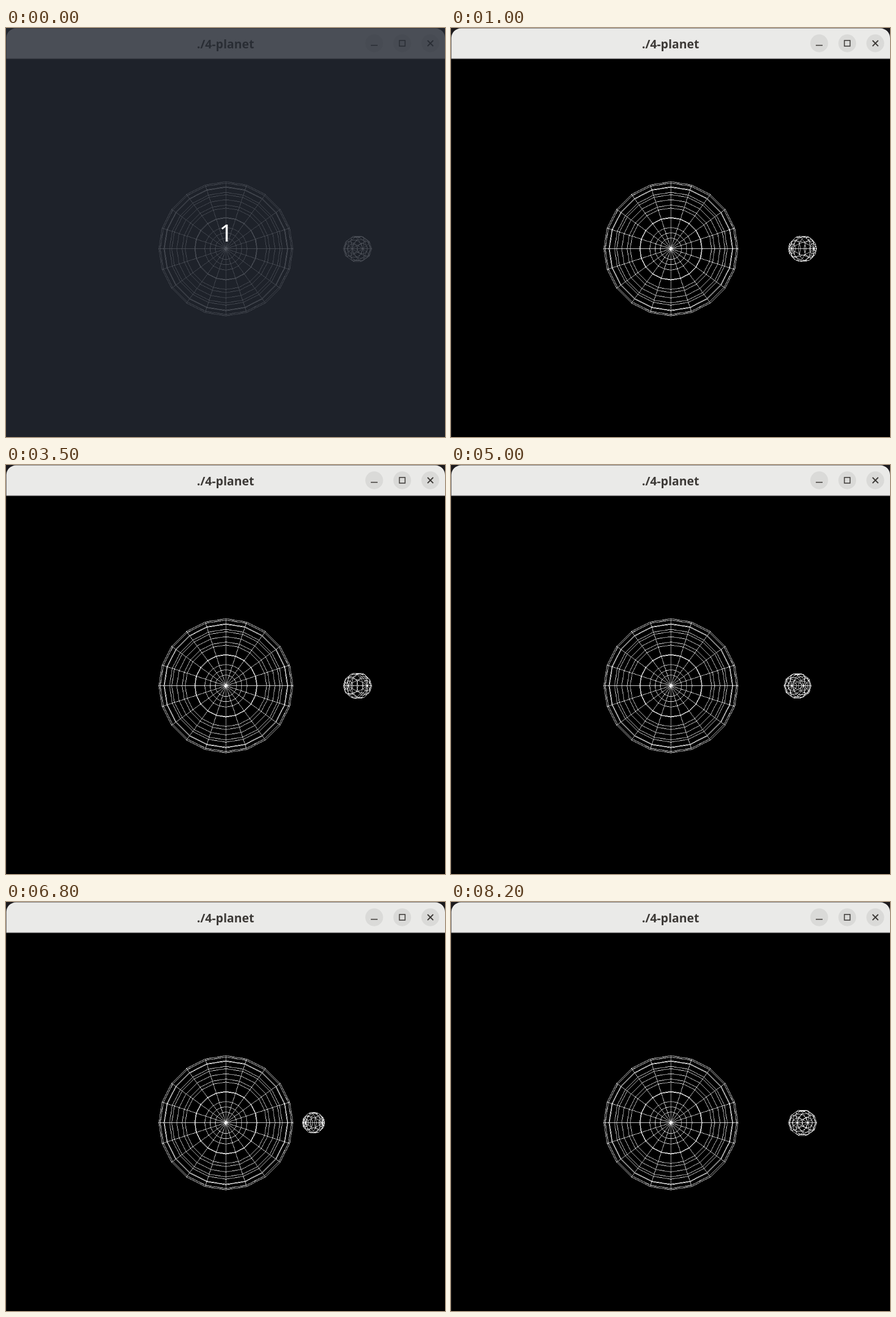
Write an HTML page with a canvas that moves like this. It is 775 px wide and 722 px high and loops after 9.7 s.

```html
<!DOCTYPE html>
<html lang="en">
<head>
<meta charset="utf-8">
<title>./4-planet</title>
<style>
  html, body { margin: 0; width: 100%; height: 100%; overflow: hidden; background: #000; }
  canvas { display: block; }
</style>
</head>
<body>
<canvas id="stage" width="775" height="722"></canvas>
<script>
const W = 775, H = 722, LOOP = 9700;
const CX = 388.2, CY = 389.7, FOCAL = 580, EYE = 5;
const ctx = document.getElementById('stage').getContext('2d');

// The wireframe is drawn on a finer grid and shown at 75 percent, as on a scaled desktop.
const SCALE = 0.75;
const grid = document.createElement('canvas');
grid.width = Math.ceil(W / SCALE);
grid.height = Math.ceil(H / SCALE);
const mesh = grid.getContext('2d');

// Times of the key presses that turn the moon and move it along its orbit.
const every200 = (start, n) => Array.from({ length: n }, (_, i) => start + 200 * i);
const dayUp = every200(600, 8);
const dayDown = every200(2500, 8);
const yearUp = every200(5000, 8);
const yearDown = [6800, 7000, 7200, 7300, 7500, ...every200(7800, 3)];

const passed = (times, t) => times.filter(p => p <= t).length;
const rad = deg => deg * Math.PI / 180;

function rotateY([x, y, z], deg) {
  const c = Math.cos(rad(deg)), s = Math.sin(rad(deg));
  return [x * c + z * s, y, z * c - x * s];
}

function project([x, y, z]) {
  const k = FOCAL / (EYE - z);
  return [(CX + x * k) / SCALE, (CY - y * k) / SCALE];
}

// Hard-edged line, one pixel per step along the longer axis.
function line([x0, y0], [x1, y1]) {
  const steep = Math.abs(y1 - y0) > Math.abs(x1 - x0);
  let [a, b, c, d] = steep ? [y0, x0, y1, x1] : [x0, y0, x1, y1];
  if (a > c) [a, b, c, d] = [c, d, a, b];
  const slope = c > a ? (d - b) / (c - a) : 0;
  for (let i = Math.floor(a); i <= Math.floor(c); i++) {
    const at = Math.min(Math.max(i + 0.5, a), c);
    const j = Math.floor(b + (at - a) * slope);
    if (steep) mesh.fillRect(j, i, 1, 1);
    else mesh.fillRect(i, j, 1, 1);
  }
}

function wireSphere(radius, slices, stacks, place) {
  const point = (i, j) => {
    const lat = Math.PI * j / stacks, lon = 2 * Math.PI * i / slices;
    const r = radius * Math.sin(lat);
    return project(place([r * Math.cos(lon), r * Math.sin(lon), radius * Math.cos(lat)]));
  };
  mesh.fillStyle = '#fff';
  for (let i = 0; i < slices; i++) {
    for (let j = 0; j < stacks; j++) {
      const p = point(i, j);
      line(p, point(i, j + 1));
      if (j) line(p, point(i + 1, j));
    }
  }
}

function drawPlanets(day, year) {
  mesh.clearRect(0, 0, grid.width, grid.height);
  wireSphere(1, 20, 16, p => p);
  wireSphere(0.2, 10, 8, p => {
    const [x, y, z] = rotateY(p, day);
    return rotateY([x + 2, y, z], year);
  });
  ctx.drawImage(grid, 0, 0, grid.width * SCALE, grid.height * SCALE);
}

function stroke(width, ...points) {
  ctx.lineWidth = width;
  ctx.beginPath();
  points.forEach(([x, y], i) => i ? ctx.lineTo(x, y) : ctx.moveTo(x, y));
  ctx.stroke();
}

function drawWindow() {
  ctx.fillStyle = '#1c1a1d';
  ctx.fillRect(0, 0, W, H);
  ctx.fillStyle = '#000';
  ctx.fillRect(1, 54, W - 1, H - 54);
  ctx.fillStyle = '#eaeae8';
  ctx.beginPath();
  ctx.roundRect(0.6, 0.6, W - 0.6, 53.1, [17, 17, 0, 0]);
  ctx.fill();
  ctx.fillStyle = '#cfcecc';
  ctx.fillRect(0.6, 53.7, W - 0.6, 0.8);

  ctx.fillStyle = '#3d3a37';
  ctx.font = 'bold 21px "Noto Sans", "Open Sans", sans-serif';
  ctx.textAlign = 'center';
  ctx.fillText('./4-planet', 387.5, 36);

  ctx.fillStyle = '#dadad8';
  for (const x of [650, 699.5, 749]) {
    ctx.beginPath();
    ctx.arc(x, 27, 15.7, 0, 2 * Math.PI);
    ctx.fill();
  }
  ctx.strokeStyle = '#3d3a37';
  stroke(1.6, [644, 30.6], [656, 30.6]);
  ctx.lineWidth = 1.6;
  ctx.strokeRect(694.5, 22, 10, 10);
  stroke(1.9, [744.2, 22], [754.2, 32]);
  stroke(1.9, [754.2, 22], [744.2, 32]);
}

function drawCountdown() {
  ctx.fillStyle = 'rgba(38, 42, 52, 0.81)';
  ctx.fillRect(0, 0, W, H);
  ctx.fillStyle = '#fff';
  ctx.font = '42px "Noto Sans", "Open Sans", sans-serif';
  ctx.textAlign = 'left';
  ctx.fillText('1', 376.5, 377);
}

function draw(day, year, counting) {
  drawWindow();
  drawPlanets(day, year);
  if (counting) drawCountdown();
}

let shown = '';
const start = performance.now();

function tick() {
  const t = (performance.now() - start) % LOOP;
  const day = 10 * (passed(dayUp, t) - passed(dayDown, t));
  const year = 5 * (passed(yearUp, t) - passed(yearDown, t));
  const counting = t < 100;
  const state = [day, year, counting].join();
  if (state !== shown) {
    draw(day, year, counting);
    shown = state;
  }
  requestAnimationFrame(tick);
}
tick();
</script>
</body>
</html>
```
